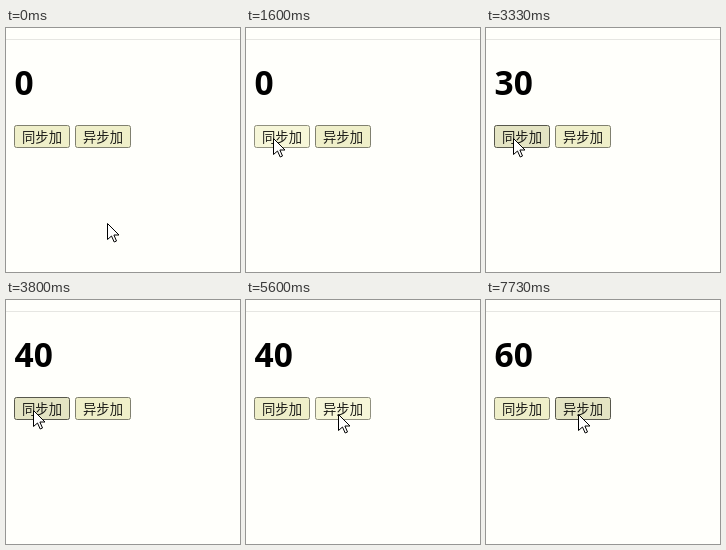
Write an HTML page with a canvas that moves like this. It is 234 px wide and 244 px high and loops after 8000 ms.

```html
<!DOCTYPE html>
<html lang="zh-CN">
<head>
<meta charset="utf-8">
<title>Counter</title>
<style>
html, body { margin: 0; width: 100%; height: 100%; overflow: hidden; background: #fffffb; }
canvas { display: block; width: 234px; height: 244px; }
</style>
</head>
<body>
<canvas></canvas>
<script>
const W = 234, H = 244, LOOP = 8000;
const canvas = document.querySelector('canvas');
const ctx = canvas.getContext('2d');
const dpr = window.devicePixelRatio || 1;
canvas.width = W * dpr;
canvas.height = H * dpr;
ctx.scale(dpr, dpr);

// Pointer strokes: quadratic curves with start and end times
const moves = [
  { from: 0, to: 730, curve: [[101, 195], [95, 100], [27, 110]] },
  { from: 4330, to: 5000, curve: [[27, 110], [60, 122], [92, 114]] }
];

// Counter values: [time, value]
const counts = [[0, 0], [1730, 10], [2800, 20], [3330, 30], [3730, 40], [6730, 60]];

const buttons = [
  { label: '同步加', x: 8, presses: [[1600, 1730], [2730, 2800], [3200, 3330], [3600, 3730]] },
  { label: '异步加', x: 69, presses: [[5600, 5730], [7400, 7530]] }
];
const BTN = { y: 97, w: 56, h: 23 };

const looks = {
  idle: ['#efefc9', '#80806f'],
  hover: ['#e4e4c3', '#57574c'],
  active: ['#f6f6d8', '#90907f']
};

// The screen refreshes in alternating steps of 130 and 70 ms
const step = t => t - t % 200 + (t % 200 < 130 ? 0 : 130);
const ease = k => k * k * (3 - 2 * k);

function pointerAt(t) {
  const { from, to, curve: [a, b, c] } = moves.filter(m => m.from <= t).pop();
  const k = ease(Math.min(1, (t - from) / (to - from)));
  const at = i => Math.round((1 - k) ** 2 * a[i] + 2 * k * (1 - k) * b[i] + k * k * c[i]);
  return [at(0), at(1)];
}

function countAt(t) {
  return counts.filter(c => c[0] <= t).pop()[1];
}

function drawButton(b, t, px, py) {
  const { y, w, h } = BTN;
  const over = px >= b.x && px < b.x + w && py >= y && py < y + h;
  const down = b.presses.some(([from, to]) => t >= from && t < to);
  const [fill, border] = looks[down ? 'active' : over ? 'hover' : 'idle'];
  ctx.beginPath();
  ctx.roundRect(b.x + 0.5, y + 0.5, w - 1, h - 1, 2);
  ctx.fillStyle = fill;
  ctx.fill();
  ctx.strokeStyle = border;
  ctx.lineWidth = 1;
  ctx.stroke();
  ctx.fillStyle = '#1c1c18';
  ctx.font = '13.333px "Noto Sans CJK SC", "Noto Sans CJK", sans-serif';
  ctx.textAlign = 'center';
  ctx.fillText(b.label, b.x + w / 2, 114);
}

function drawPointer(x, y) {
  const arrow = new Path2D('M0 0V16L4 12.5L6.7 18.5L9 17.5L6.4 11.5H11.5Z');
  ctx.save();
  ctx.translate(x + 0.5, y + 0.5);
  ctx.fillStyle = '#fff';
  ctx.fill(arrow);
  ctx.strokeStyle = '#000';
  ctx.lineWidth = 1;
  ctx.stroke(arrow);
  ctx.restore();
}

function draw(now) {
  const t = step(now % LOOP);
  const [px, py] = pointerAt(t);
  ctx.fillStyle = '#fffffb';
  ctx.fillRect(0, 0, W, H);
  ctx.fillStyle = '#e6e6e2';
  ctx.fillRect(0, 11, W, 1);
  ctx.fillStyle = '#000';
  ctx.font = 'bold 33.5px "Open Sans", "Noto Sans", sans-serif';
  ctx.textAlign = 'left';
  ctx.fillText(countAt(t), 8.6, 67);
  buttons.forEach(b => drawButton(b, t, px, py));
  drawPointer(px, py);
}

const start = performance.now();
function tick() {
  draw(Math.max(0, performance.now() - start));
  requestAnimationFrame(tick);
}
tick();
</script>
</body>
</html>
```
